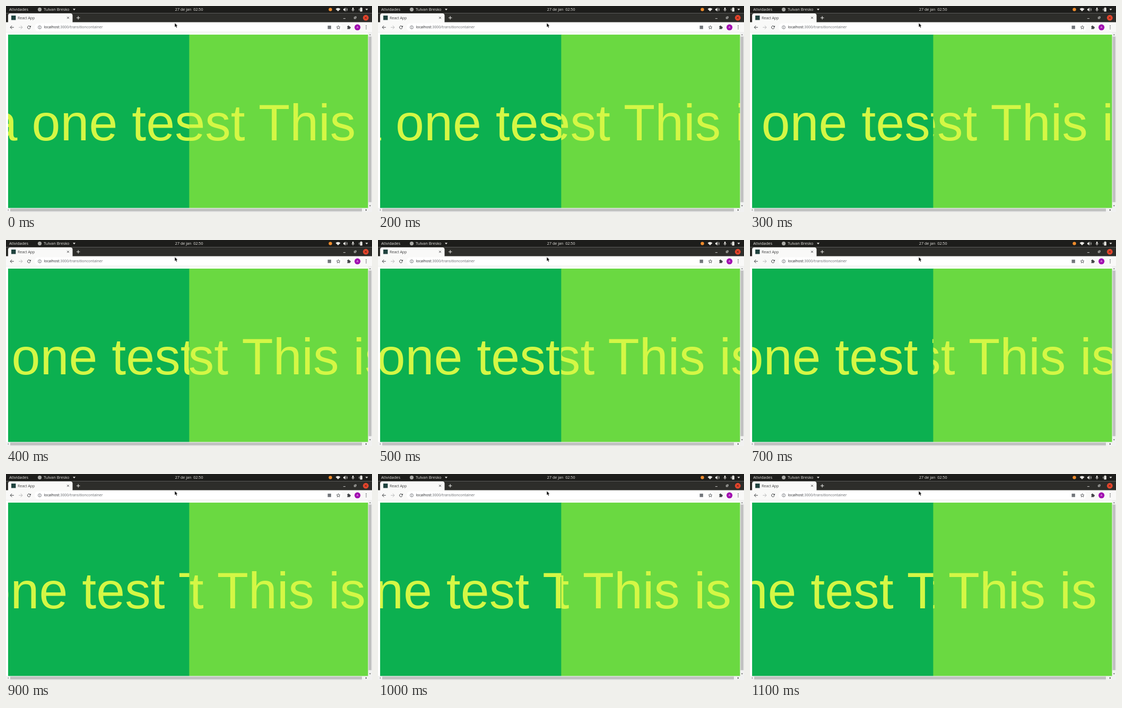
Recreate the animation shown at these times as an HTML page with a canvas. Size 690 by 388 pixels, loop 1200 ms.

```html
<!DOCTYPE html>
<html lang="pt">
<head>
<meta charset="utf-8">
<title>React App</title>
<style>
html, body { margin: 0; width: 100%; height: 100%; overflow: hidden; background: #fff; }
canvas { display: block; width: 690px; height: 388px; }
</style>
</head>
<body>
<canvas id="stage" width="690" height="388"></canvas>
<script>
const ctx = document.getElementById('stage').getContext('2d');
const LOOP = 1200, STEP = 100;
const SIZE = 97, BASE = 252.6;
const LEFT = 4, SPLIT = 345.4, RIGHT = 683, TOP = 53.9, BOTTOM = 381;
const UI = '"Open Sans", "Noto Sans", sans-serif';
const BIG = SIZE + 'px "Liberation Sans", Arial, sans-serif';
// distance scrolled by the left line at each step
const travel = [0, 8, 15.5, 27, 38, 51, 64, 77, 85.5, 94, 108.5, 123];

function rect(x, y, w, h, color) {
  ctx.fillStyle = color;
  ctx.fillRect(x, y, w, h);
}

function disc(x, y, r, color) {
  ctx.fillStyle = color;
  ctx.beginPath();
  ctx.arc(x, y, r, 0, Math.PI * 2);
  ctx.fill();
}

function ring(x, y, r, color, from = 0, to = Math.PI * 2, width = 1) {
  ctx.strokeStyle = color;
  ctx.lineWidth = width;
  ctx.beginPath();
  ctx.arc(x, y, r, from, to);
  ctx.stroke();
}

function box(x, y, w, h, r, color) {
  ctx.fillStyle = color;
  ctx.beginPath();
  ctx.roundRect(x, y, w, h, r);
  ctx.fill();
}

function trace(points) {
  ctx.beginPath();
  for (let i = 0; i < points.length; i += 2) ctx.lineTo(points[i], points[i + 1]);
}

function poly(color, ...points) {
  trace(points);
  ctx.closePath();
  ctx.fillStyle = color;
  ctx.fill();
}

function line(color, width, ...points) {
  trace(points);
  ctx.strokeStyle = color;
  ctx.lineWidth = width;
  ctx.stroke();
}

function label(str, x, y, size, color, align = 'left') {
  ctx.font = `${size}px ${UI}`;
  ctx.textAlign = align;
  ctx.fillStyle = color;
  ctx.fillText(str, x, y);
}

function cross(x, y, r, color) {
  line(color, 0.9, x - r, y - r, x + r, y + r);
  line(color, 0.9, x + r, y - r, x - r, y + r);
}

function topBar() {
  const ink = '#e8e6e2';
  rect(0, 0, 690, 13.5, '#1d1d1b');
  label('Atividades', 6, 9.4, 7.5, ink);
  disc(63.5, 6.6, 3.6, '#a9a9a5');
  label('Tulvan Bresko', 71, 9.4, 7.5, ink);
  poly(ink, 126, 5.3, 131, 5.3, 128.5, 8.2);
  label('27 de jan  02:50', 345.2, 9.4, 7.2, ink, 'center');
  disc(611.5, 6.6, 3.2, '#f08c2c');
  ctx.fillStyle = ink;
  ctx.beginPath();
  ctx.moveTo(626, 10);
  ctx.arc(626, 10, 6.2, -Math.PI * 0.76, -Math.PI * 0.24);
  ctx.fill();
  poly(ink, 636, 5.2, 637.6, 5.2, 639.8, 3, 639.8, 10.4, 637.6, 8.2, 636, 8.2);
  ring(639.8, 6.7, 1.8, ink, -1, 1, 0.8);
  ring(639.8, 6.7, 3.7, ink, -1, 1, 0.8);
  box(652.9, 3, 2.4, 4.6, 1.2, ink);
  ring(654.1, 6.3, 2.4, ink, 0, Math.PI, 0.7);
  line(ink, 0.7, 654.1, 8.6, 654.1, 10.4);
  box(667.4, 3.4, 4.4, 7, 0.6, ink);
  rect(668.6, 2.5, 2, 1, ink);
  line(ink, 0.8, 665.8, 5, 665.8, 8.6);
  poly(ink, 677.5, 5.3, 682.5, 5.3, 680, 8.2);
}

function tabStrip() {
  rect(0, 13.5, 690, 17.2, '#2d2d2a');
  box(4, 14, 121.5, 20, 4, '#f9f9f8');
  rect(10, 18, 8.4, 8.4, '#20433f');
  label('React App', 22, 24.6, 6.9, '#3c3c3c');
  cross(117, 22.2, 1.9, '#444');
  line('#f2f2f0', 1, 133, 22.2, 139.4, 22.2);
  line('#f2f2f0', 1, 136.2, 19, 136.2, 25.4);
  line('#d8d8d4', 0.9, 635.8, 23.6, 640, 23.6);
  ctx.strokeRect(656.5, 21, 2.8, 2.8);
  line('#d8d8d4', 0.7, 658, 20, 660.3, 20, 660.3, 22.2);
  disc(678.3, 22.2, 5.4, '#e5452c');
  cross(678.3, 22.2, 1.9, '#421a12');
}

function toolbar() {
  const ink = '#414346';
  rect(0, 30.7, 690, 19, '#f9f9f8');
  rect(0, 49.5, 690, 0.5, '#dededc');
  box(54, 32.6, 580, 15, 7.5, '#fff');
  line(ink, 1, 14.8, 40.2, 8.2, 40.2);
  line(ink, 1, 11.2, 37, 8, 40.2, 11.2, 43.4);
  line('#b6b7b8', 1, 24.2, 40.2, 30.8, 40.2);
  line('#b6b7b8', 1, 27.8, 37, 31, 40.2, 27.8, 43.4);
  ring(43.3, 40.2, 2.8, ink, 0.35, 5.6);
  poly(ink, 46.8, 36.8, 46.8, 39.9, 43.7, 39.9);
  ring(63.5, 40.2, 3, '#5f6368', 0, Math.PI * 2, 0.8);
  line('#5f6368', 0.8, 63.5, 39.6, 63.5, 42);
  rect(63.1, 38.2, 0.8, 0.8, '#5f6368');
  label('localhost', 71.5, 42.4, 6.95, '#1f2124');
  const w = ctx.measureText('localhost').width;
  label(':3000/transitioncontainer', 71.5 + w, 42.4, 6.95, '#66696d');
  rect(606.5, 37, 6.4, 6.4, '#73777c');
  const star = [];
  for (let i = 0; i < 10; i++) {
    const a = i * Math.PI / 5 - Math.PI / 2, r = i % 2 ? 1.6 : 3.6;
    star.push(626.5 + r * Math.cos(a), 40.4 + r * Math.sin(a));
  }
  line(ink, 0.8, ...star, star[0], star[1]);
  rect(643.3, 38.2, 5.2, 5.2, ink);
  disc(645.6, 38, 1.2, ink);
  disc(648.7, 40.7, 1.2, ink);
  disc(643.4, 40.9, 0.9, '#f9f9f8');
  disc(662.6, 40.2, 5.6, '#a10bb0');
  label('A', 662.6, 42.3, 5.6, '#fff', 'center');
  for (const y of [37.4, 40.2, 43]) disc(679, y, 0.8, ink);
}

function scrollbars() {
  rect(682.5, 50, 7.5, 338, '#f1f1f1');
  rect(0, 380.4, 690, 7.6, '#f1f1f1');
  rect(683.5, 57.5, 5.5, 312, '#c1c1c1');
  rect(8, 381.5, 663, 5.4, '#c1c1c1');
  poly('#777', 684.6, 55, 688, 55, 686.3, 53);
  poly('#555', 684.6, 375.5, 688, 375.5, 686.3, 377.5);
  poly('#999', 5, 382.5, 5, 386, 3, 384.2);
  poly('#333', 678, 382.4, 678, 386, 680.2, 384.2);
}

function pointer() {
  poly('#111', 318.3, 32.2, 318.3, 39.4, 320, 37.9, 321.2, 40.7, 322.4, 40.2, 321.2, 37.5, 323.4, 37.3);
  line('rgba(255,255,255,.6)', 0.4, 318.3, 32.2, 323.4, 37.3, 321.2, 37.5);
}

// a panel with its line placed so that "rest" starts at x
function panel(left, right, color, lead, rest, x) {
  ctx.save();
  rect(left, TOP, right - left, BOTTOM - TOP, color);
  ctx.beginPath();
  ctx.rect(left, TOP, right - left, BOTTOM - TOP);
  ctx.clip();
  ctx.font = BIG;
  ctx.fontKerning = 'normal';
  ctx.textRendering = 'optimizeLegibility'; // also kerns across spaces
  ctx.textAlign = 'left';
  ctx.fillStyle = '#d4f745';
  const indent = ctx.measureText(lead + rest).width - ctx.measureText(rest).width;
  ctx.fillText(lead + rest, x - indent, BASE);
  ctx.restore();
}

function draw(now) {
  const p = travel[Math.floor((now % LOOP) / STEP)];
  rect(0, 0, 690, 388, '#fff');
  topBar();
  tabStrip();
  toolbar();
  // the second panel covers the first one's edge, leaving no seam
  panel(LEFT, SPLIT + 1, '#0cb050', 'is a one ', 'test This is', 237.3 - p);
  panel(SPLIT, RIGHT, '#6ad941', 'one test ', 'This is a', 476 - p * 0.832);
  scrollbars();
  pointer();
}

const start = performance.now();
function tick() {
  draw(performance.now() - start);
  requestAnimationFrame(tick);
}
draw(0);
requestAnimationFrame(tick);
</script>
</body>
</html>
```
